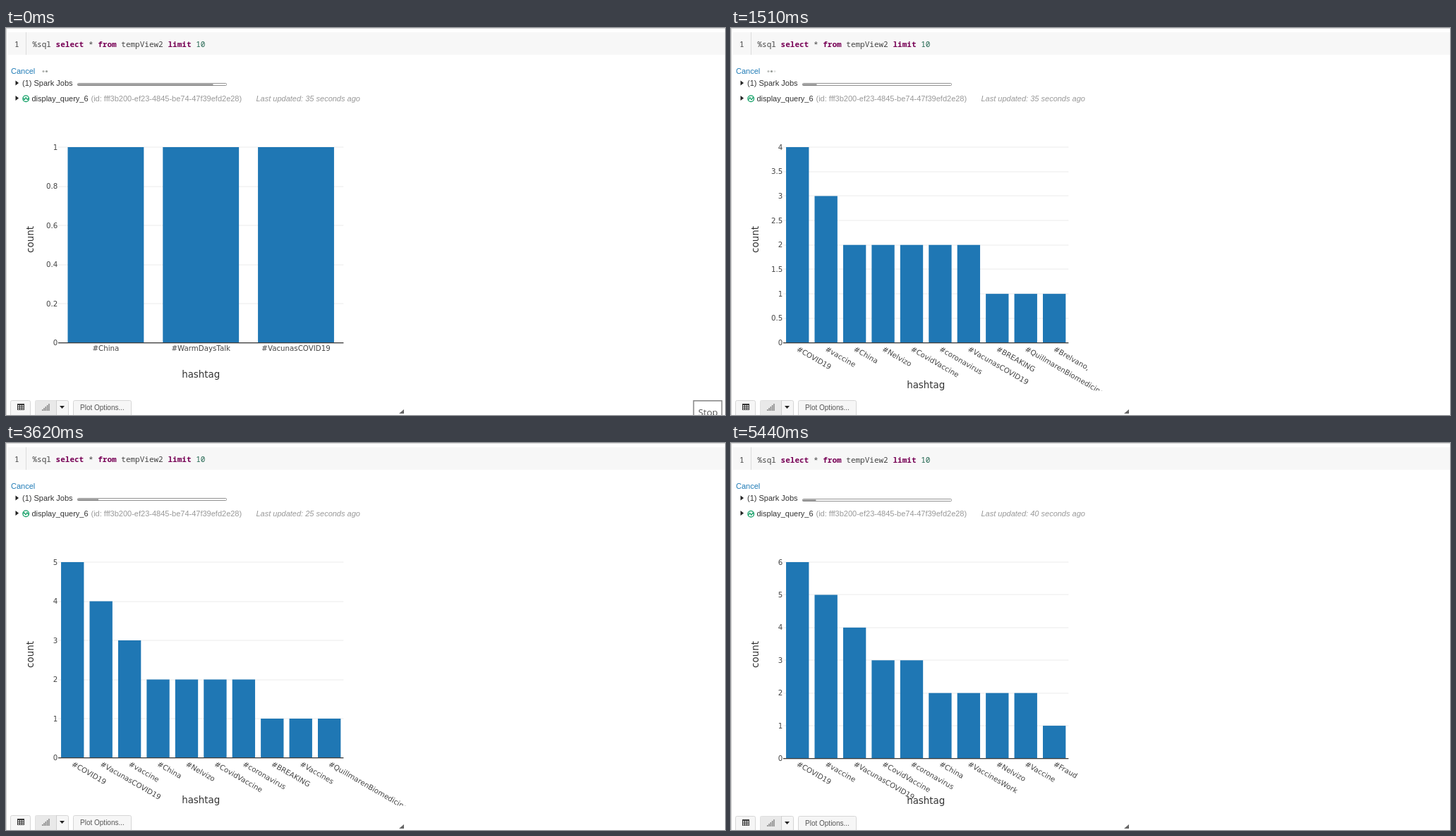
An HTML page with a canvas for the animation above (5.5 s loop, 1019 by 549 pixels).

```html
<!DOCTYPE html>
<html lang="en">
<head>
<meta charset="utf-8">
<title>Streaming query chart</title>
<style>
html, body { margin: 0; width: 100%; height: 100%; overflow: hidden; background: #fff; }
canvas { display: block; }
</style>
</head>
<body>
<canvas id="stage" width="1019" height="549"></canvas>
<script>
const ctx = document.getElementById('stage').getContext('2d');
const LOOP = 5500;
const RAMP = 400;
const SANS = '"Liberation Sans", Arial, sans-serif';
const PLOT = '"DejaVu Sans", Verdana, sans-serif';
const MONO = '"Noto Sans Mono", "DejaVu Sans Mono", monospace';
const AXIS = { left: 74, right: 478.4, top: 169, base: 446.5 };

// Each batch: start time, job progress from/to, then the tags by count, highest first.
function batch(at, from, to, max, ...groups) {
  const bars = groups.flatMap((tags, i) =>
    tags.split(' ').map(tag => ({ tag: '#' + tag, n: max - i })));
  const step = [0.2, 0.5, 1].find(s => max / s <= 8);
  return { at, from, to, max, step, bars };
}

const batches = [
  batch(0, 0.91, 0.91, 1, 'China WarmDaysTalk VacunasCOVID19'),
  batch(360, 0, 0.9, 2, 'China coronavirus',
    'BREAKING QuillmarenBiomedicines Brelvano, QVO vaccine Canada, Nelvizo CovidVaccine'),
  batch(1430, 0, 0.89, 4, 'COVID19', 'vaccine',
    'China Nelvizo CovidVaccine coronavirus VacunasCOVID19',
    'BREAKING QuillmarenBiomedicines Brelvano,'),
  batch(2680, 0, 0.14, 5, 'COVID19', 'VacunasCOVID19', 'vaccine',
    'China Nelvizo CovidVaccine coronavirus', 'BREAKING Vaccines QuillmarenBiomedicines'),
  batch(3890, 0, 0.14, 5, 'COVID19', 'VacunasCOVID19', 'vaccine CovidVaccine coronavirus',
    'China VaccinesWork Nelvizo', 'BREAKING Vaccines'),
  batch(4470, 0.14, 0.91, 5, 'COVID19', 'vaccine VacunasCOVID19', 'CovidVaccine coronavirus',
    'China VaccinesWork Nelvizo', 'BREAKING Vaccines'),
  batch(5100, 0, 0.095, 6, 'COVID19', 'vaccine', 'VacunasCOVID19', 'CovidVaccine coronavirus',
    'China VaccinesWork Nelvizo Vaccine', 'Fraud')
];

function ease(u) {
  u = Math.min(1, Math.max(0, u));
  return u * u * (3 - 2 * u);
}

function rect(x, y, w, h, color) {
  ctx.fillStyle = color;
  ctx.fillRect(x, y, w, h);
}

function triangle(color, x1, y1, x2, y2, x3, y3) {
  ctx.fillStyle = color;
  ctx.beginPath();
  ctx.moveTo(x1, y1);
  ctx.lineTo(x2, y2);
  ctx.lineTo(x3, y3);
  ctx.fill();
}

function text(str, x, y, font, color, align = 'left') {
  ctx.font = font;
  ctx.fillStyle = color;
  ctx.textAlign = align;
  ctx.fillText(str, x, y);
}

function rotated(str, x, y, angle, font, color, align) {
  ctx.save();
  ctx.translate(x, y);
  ctx.rotate(angle);
  text(str, 0, 0, font, color, align);
  ctx.restore();
}

function box(x, y, w, h, fill, line, r = 2) {
  ctx.beginPath();
  ctx.roundRect(x + 0.5, y + 0.5, w, h, r);
  ctx.fillStyle = fill;
  ctx.fill();
  ctx.strokeStyle = line;
  ctx.lineWidth = 1;
  ctx.stroke();
}

function drawHeader(dy) {
  rect(0, 0, 1019, 1, '#d4d4d4');
  rect(0, 0, 1, 549, '#cfcfcf');
  rect(3, 6, 1016, 32, '#f7f7f7');
  rect(28, 6, 1, 32, '#dcdcdc');
  const y = 27 + dy, cell = 6.62;
  text('1', 12, y, `11px ${MONO}`, '#444');
  let x = 37.5;
  for (const word of '%sql select * from tempView2 limit 10'.split(' ')) {
    const key = /^(select|from|limit)$/.test(word);
    const color = key ? '#770055' : word === '10' ? '#226650' : '#444';
    text(word, x, y, `${key ? 'bold ' : ''}11px ${MONO}`, color);
    x += (word.length + 1) * cell;
  }
}

// A pulse sweeping to the right over three dots
function drawDots(t) {
  let phase = (t - 360) / 166.5;
  phase -= Math.round(phase);
  if (Math.abs(phase) > 0.35) return;
  const peak = 2 + 2 * phase;
  for (let i = 1; i <= 3; i++) {
    const a = Math.sqrt(Math.max(0, 1 - Math.abs(i - peak) / 1.25));
    ctx.fillStyle = `rgba(140,145,140,${a})`;
    ctx.beginPath();
    ctx.arc(48.5 + 4.5 * i, 61.5, 1.6, 0, 7);
    ctx.fill();
  }
}

function drawStreamIcon(t, y) {
  ctx.strokeStyle = '#12a066';
  ctx.lineWidth = 1.3;
  ctx.beginPath();
  ctx.arc(28.2, y, 4.3, 0, 7);
  ctx.stroke();
  ctx.beginPath();
  for (let x = -3.5; x <= 3.5; x += 0.5)
    ctx.lineTo(28.2 + x, y - 1.4 * Math.sin(x * 1.5 + 1.5 - t / 90));
  ctx.stroke();
}

function drawStatus(t, { at, from, to }, dy) {
  const font = `11px ${SANS}`;
  text('Cancel', 7, 65, font, '#1f7bb6');
  drawDots(t);
  for (const y of [78, 99.5]) triangle('#222', 13.5, y - 3.5, 18, y, 13.5, y + 3.5);
  text('(1) Spark Jobs', 23, 82, font, '#333');

  const done = from + (to - from) * ease((t - at) / RAMP);
  box(101, 78 + dy, 211, 3, '#fff', '#929292', 1);
  rect(101.5, 79.5 + dy, 211 * done, 2, '#888');

  drawStreamIcon(t, 100.2 + dy / 2);
  text('display_query_6', 36.5, 104, font, '#333');
  text('(id: fff3b200-ef23-4845-be74-47f39efd2e28)', 120.5, 104, font, '#999');
  const age = t < 2680 ? 35 : t < 4470 ? 25 : 40;
  text(`Last updated: ${age} seconds ago`, 354.5, 104, `italic ${font}`, '#999');
}

function drawChart({ max, step, bars }, dy) {
  const { left, right, top } = AXIS, base = AXIS.base + dy;
  const small = `10.25px ${PLOT}`, large = `13.4px ${PLOT}`;
  const yOf = v => base - v / max * (base - top);

  for (let i = 0; i <= Math.round(max / step); i++) {
    const v = +(i * step).toFixed(1), y = yOf(v);
    if (i) rect(left, Math.round(y) - 0.5, right - left, 1, '#ececec');
    text(v, 73.2, y + 3.6, small, '#444', 'right');
  }
  const slot = (right - left) / bars.length;
  bars.forEach(({ n }, i) =>
    rect(left + slot * (i + 0.1), yOf(n), slot * 0.8, base - yOf(n), '#1f77b4'));
  rect(left, base - 0.5, right - left, 1.3, '#3a3a3a');

  const flat = bars.length < 5;
  ctx.save();
  ctx.beginPath();
  ctx.rect(0, 440, 1019, 74.5);
  ctx.clip();
  bars.forEach(({ tag }, i) => {
    const x = left + slot * (i + 0.5);
    if (flat) text(tag, x, 457.7, small, '#444', 'center');
    else rotated(tag, x - 2, 457.5, Math.PI / 6, small, '#444', 'left');
  });
  ctx.restore();
  text('hashtag', 276.2, (flat ? 495.5 : 511) + dy, large, '#333', 'center');
  rotated('count', 38.5, 300, -Math.PI / 2, large, '#333', 'center');
}

function drawToolbar(dy) {
  ctx.save();
  ctx.translate(0, dy);
  box(6, 528, 28, 24, '#f6f6f6', '#d6d6d6');
  box(41, 528, 47, 24, '#f6f6f6', '#d6d6d6');
  rect(41.5, 528.5, 30, 24, '#e9e9e9');
  rect(71, 528, 1, 24, '#cfcfcf');
  box(95, 528, 82, 24, '#f6f6f6', '#d6d6d6');

  rect(16, 533, 10, 9, '#333');
  for (let r = 0; r < 3; r++)
    for (let c = 0; c < 3; c++) rect(17 + c * 3, 535 + r * 2.4, 2, 1.4, '#f6f6f6');
  for (let i = 0; i < 5; i++) rect(51 + i * 2.3, 541 - i * 2, 1.5, 2 + i * 2, '#888');
  triangle('#222', 76, 536, 83, 536, 79.5, 540);
  text('Plot Options...', 105, 541.5, `10px ${SANS}`, '#555');
  ctx.restore();
  triangle('#666', 564, 541, 564, 547, 557, 547);
}

function drawStop() {
  rect(974, 528, 41, 30, '#fff');
  ctx.strokeStyle = '#8a8a8a';
  ctx.lineWidth = 1.6;
  ctx.strokeRect(974.5, 528.8, 40, 30);
  text('Stop', 981, 549.5, '13.2px "Open Sans", sans-serif', '#555');
}

function draw(t) {
  const now = batches.filter(b => b.at <= t).pop();
  const dy = now.max === 6 ? 1 : 0;
  rect(0, 0, 1019, 549, '#fff');
  drawHeader(dy);
  drawStatus(t, now, dy);
  drawChart(now, dy);
  drawToolbar(dy);
  if (t < 1430) drawStop();
}

const start = performance.now();
function tick() {
  draw((performance.now() - start) % LOOP);
  requestAnimationFrame(tick);
}
tick();
</script>
</body>
</html>
```
